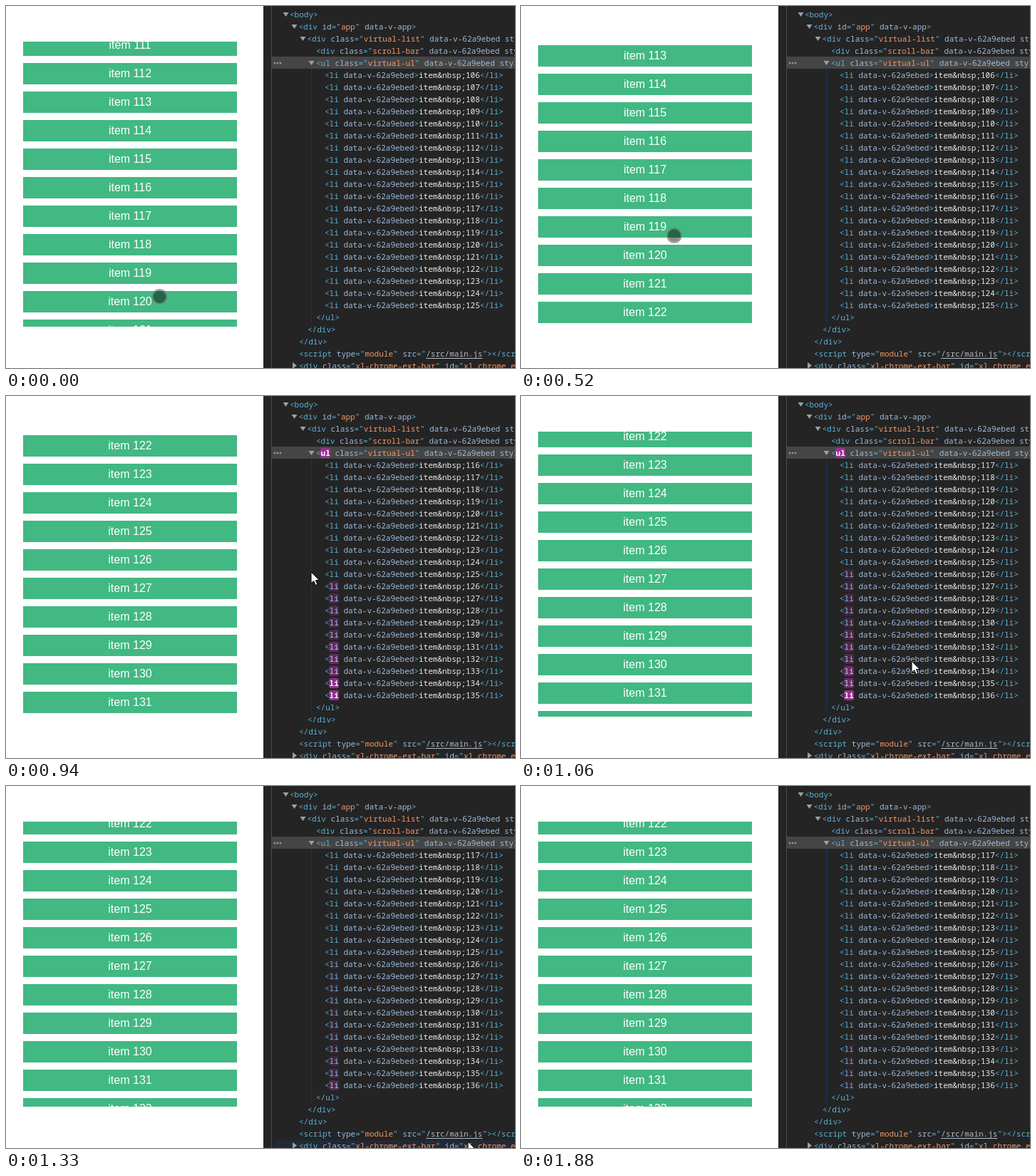
These frames come from a looping animation (714 by 508 pixels, 1.98 s). An HTML page with a canvas:

```html
<!DOCTYPE html>
<html lang="en">
<head>
<meta charset="utf-8">
<title>Virtual list</title>
<style>
html, body { margin: 0; width: 100%; height: 100%; overflow: hidden; background: #fff; }
canvas { display: block; }
</style>
</head>
<body>
<canvas id="stage" width="714" height="508"></canvas>
<script>
const ctx = document.getElementById('stage').getContext('2d');
const LOOP = 1980, W = 714, H = 508;
const CHAR = 6.6, ROW = 17;
const SCOPE = 'data-v-62a9ebed';
const TAG = '#5db0d7', ATTR = '#9bbbdc', VALUE = '#f29766', TEXT = '#e8eaed', LINK = '#b3bcc6';

// at: start time, top: y of item 112, first: first item in the DOM
const states = [
  { at: 0, top: 80, first: 106, touch: [215.5, 408] },
  { at: 400, top: 79, first: 106 },
  { at: 520, top: 15, first: 106, touch: [215, 322] },
  { at: 670, top: -175, first: 111, ul: 1, touch: [214.5, 117.5] },
  { at: 820, top: -300, first: 114, ul: 1, touch: [220, 60] },
  { at: 940, top: -345, first: 116, ul: 1, arrow: [428, 247] },
  { at: 1060, top: -358, first: 117, ul: 1, arrow: [548, 372] },
  { at: 1180, top: -362, first: 117, ul: 0.8, arrow: [665, 475], hover: 26, overlay: true },
  { at: 1330, top: -362, first: 117, arrow: [648, 499], hover: 29 },
  { at: 1460, top: -362, first: 117, settled: 0.2 },
  { at: 1610, top: -362, first: 117, settled: 0.14 },
  { at: 1880, top: -362, first: 117, settled: 0.09 }
];

function rect(x, y, w, h, color) {
  ctx.fillStyle = color;
  ctx.fillRect(x, y, w, h);
}

function polygon(points, color) {
  ctx.beginPath();
  points.forEach(([x, y]) => ctx.lineTo(x, y));
  ctx.closePath();
  ctx.fillStyle = color;
  ctx.fill();
}

function roundBox(x, y, w, h, r, color) {
  ctx.beginPath();
  ctx.roundRect(x, y, w, h, r);
  ctx.fillStyle = color;
  ctx.fill();
}

function openTag(name, attrs = '') {
  const parts = [['<', TAG], [name, TAG]];
  for (const attr of attrs.split(' ').filter(Boolean)) {
    const [key, value] = attr.split('=');
    parts.push([' ' + key, ATTR]);
    if (value) parts.push(['="', TAG], [value, key === 'src' ? LINK : VALUE], ['"', TAG]);
  }
  return [...parts, ['>', TAG]];
}

const closeTag = name => [['</', TAG], [name, TAG], ['>', TAG]];

function glowText(amount) {
  const mix = (a, b) => Math.round(a + (b - a) * amount);
  return `rgb(${mix(93, 255)},${mix(176, 255)},${mix(215, 255)})`;
}

function drawRow(index, x, parts, glow = 0) {
  const mid = 12 + index * ROW;
  parts.forEach(([text, color], i) => {
    const width = text.length * CHAR;
    const lit = i === 1 && glow > 0;
    if (lit) roundBox(x - 0.5, mid - 7, width + 0.5, 14, 2, `rgba(158,48,152,${glow})`);
    ctx.font = `${lit && glow > 0.6 ? 'bold ' : ''}11px "Noto Sans Mono", monospace`;
    ctx.fillStyle = lit ? glowText(glow) : color;
    ctx.fillText(text, x, mid + 4);
    if (color === LINK) rect(x, mid + 6, width, 1, LINK);
    x += width;
  });
}

function arrowDown(x, index) {
  const y = 12 + index * ROW;
  polygon([[x - 4, y - 3], [x + 4, y - 3], [x, y + 3]], '#9aa0a6');
}

function itemGlow(item, state) {
  if (state.at < 670 || item < 126) return 0;
  if (state.settled) return item === 136 ? state.settled : item > 132 ? 0.08 : 0;
  const added = item < 131 ? 640 : item < 134 ? 780 : item < 136 ? 920 : 1080;
  return 0.95 * Math.exp(-Math.max(0, state.at - added) / 280);
}

function drawList(state) {
  rect(0, 0, 361, H, '#fff');
  ctx.save();
  ctx.beginPath();
  ctx.rect(24, 50, 300, 400);
  ctx.clip();
  ctx.font = '16px "Liberation Sans", Arial, sans-serif';
  ctx.textAlign = 'center';
  for (let item = 106; item < 137; item++) {
    const y = state.top + (item - 112) * 40;
    if (y < 10 || y > 450) continue;
    rect(24, y, 300, 30, '#42b883');
    ctx.fillStyle = '#fff';
    ctx.fillText('item ' + item, 174, y + 20);
  }
  ctx.restore();
  if (state.overlay) rect(24, 0, 300, H, 'rgba(111,168,220,.66)');
}

function drawInspector(state) {
  rect(361, 0, W - 361, H, '#242424');
  rect(372, 0, 1, H, '#4a4c50');
  rect(373, 71, W - 373, ROW, '#454545');
  if (state.hover) roundBox(376, 4 + state.hover * ROW, W - 372, 16, 3, '#222a36');
  rect(428, 88, 1, 357, '#1b3560');
  for (const x of [377, 381, 385]) roundBox(x - 1.5, 78.5, 3, 3, 1.5, '#8b8e92');

  [[392.5, 0], [404.5, 1], [416.5, 2], [428.5, 4]].forEach(([x, i]) => arrowDown(x, i));
  polygon([[402, 500], [408, 504.5], [402, 509]], '#9aa0a6');

  drawRow(0, 398, openTag('body'));
  drawRow(1, 410.5, openTag('div', 'id=app data-v-app'));
  drawRow(2, 422.5, openTag('div', `class=virtual-list ${SCOPE} style=height`));
  drawRow(3, 435, openTag('div', `class=scroll-bar ${SCOPE} style=height`));
  drawRow(4, 435, openTag('ul', `class=virtual-ul ${SCOPE} style=height`), state.ul);
  for (let i = 0; i < 20; i++) {
    const item = state.first + i;
    const parts = [...openTag('li', SCOPE), ['item&nbsp;' + item, TEXT], ...closeTag('li')];
    drawRow(5 + i, 447, parts, itemGlow(item, state));
  }
  drawRow(25, 435, closeTag('ul'));
  drawRow(26, 423, closeTag('div'));
  drawRow(27, 411, closeTag('div'));
  drawRow(28, 411, [...openTag('script', 'type=module src=/src/main.js'), ...closeTag('script')]);
  drawRow(29, 411, openTag('div', 'class=xl-chrome-ext-bar id=xl_chrome_ext_bar'));
}

function drawTouch([x, y]) {
  ctx.beginPath();
  ctx.arc(x, y, 10, 0, 7);
  ctx.strokeStyle = 'rgba(110,120,115,.65)';
  ctx.lineWidth = 2;
  ctx.stroke();
  ctx.beginPath();
  ctx.arc(x, y, 9, 0, 7);
  ctx.fillStyle = 'rgba(0,0,0,.45)';
  ctx.fill();
}

function drawArrow([x, y]) {
  const shape = [[0, 0], [0, 16], [3.7, 12.6], [6.2, 18.5], [8.8, 17.3], [6.4, 11.6], [11.5, 11.6]];
  polygon(shape.map(([dx, dy]) => [x + dx, y + dy]), '#fff');
  ctx.strokeStyle = '#000';
  ctx.lineWidth = 1;
  ctx.stroke();
}

function render(now) {
  const time = now % LOOP;
  const state = states.filter(s => s.at <= time).pop();
  drawList(state);
  drawInspector(state);
  if (state.touch) drawTouch(state.touch);
  if (state.arrow) drawArrow(state.arrow);
}

const start = performance.now();
function tick() {
  render(performance.now() - start);
  requestAnimationFrame(tick);
}
tick();
</script>
</body>
</html>
```
